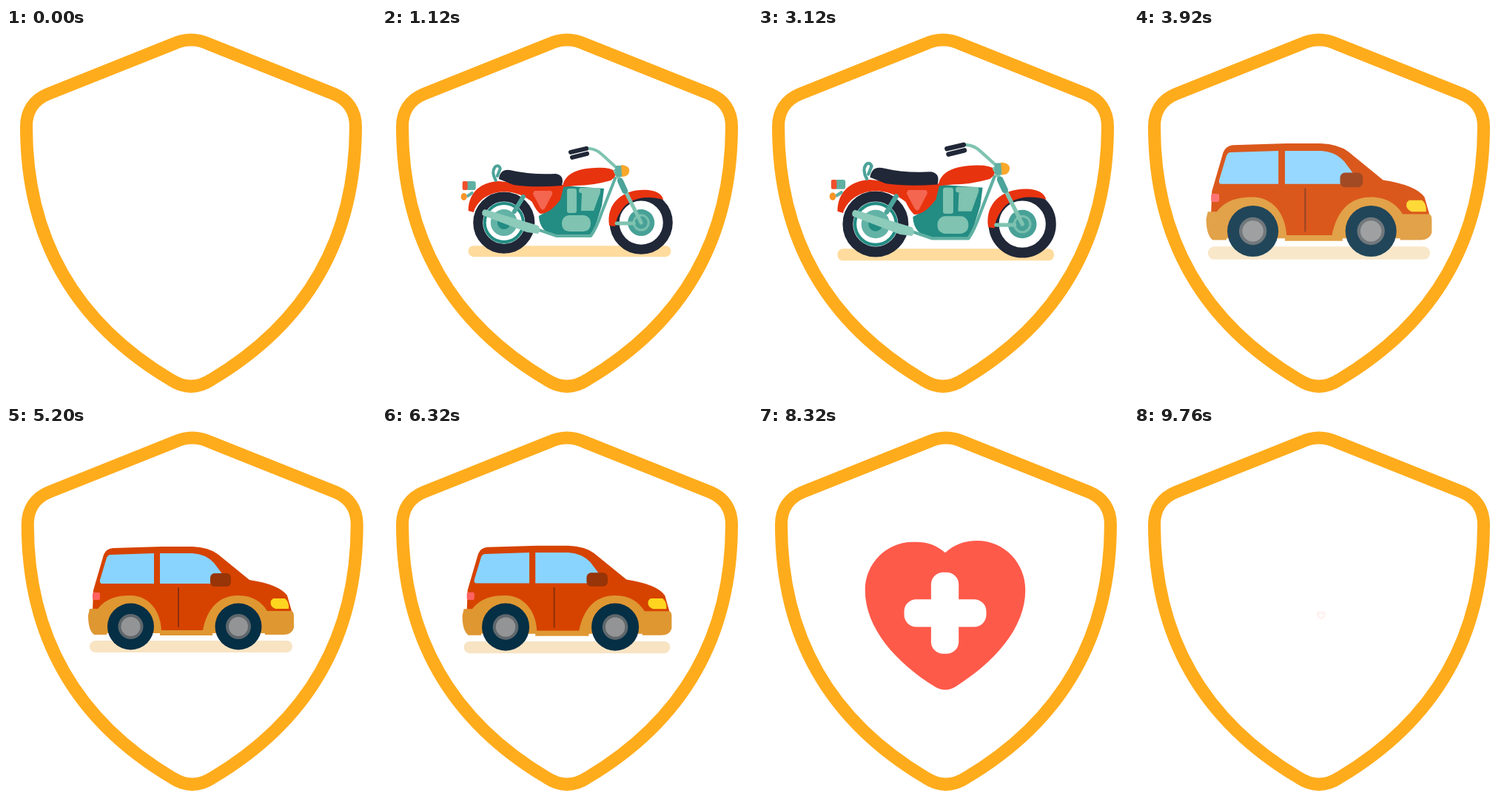
An HTML page for the animation above (9.84 s loop, 500 px wide and 500 px high).

```html
<!DOCTYPE html>
<html lang="en">
<head>
<meta charset="utf-8">
<title>Shield</title>
<style>
  html, body { margin: 0; height: 100%; overflow: hidden; background: #fff; }
  svg { display: block; width: 100%; height: 100%; }
</style>
</head>
<body>
<svg viewBox="0 0 500 500" fill="none" stroke-linecap="round" stroke-linejoin="round">
  <path id="shield" stroke="#ffac1c" stroke-width="17" d="M225 22Q250 10 275 22L444 89.500C462 97 472.500 112 472.500 133C472.500 318 374 418 277 475.500Q250 493 223 475.500C126 418 27.500 318 27.500 133C27.500 112 38 97 56 89.500Z"/>

  <g id="bike" visibility="hidden">
    <rect x="117" y="294" width="273" height="15" rx="7" fill="#ffdb9e"/>
    <g stroke="#202737" stroke-width="13" fill="#fff">
      <circle cx="165" cy="263" r="35"/>
      <circle cx="350" cy="263" r="36"/>
    </g>
    <circle cx="165" cy="263" r="26" stroke="#238c83" stroke-width="4"/>
    <g fill="#62b3a6">
      <circle cx="165" cy="263" r="18"/>
      <circle cx="350" cy="263" r="18" fill="#48a197"/>
    </g>
    <circle cx="165" cy="263" r="9" fill="#238c83"/>
    <circle cx="350" cy="263" r="10" stroke="#79bfae" stroke-width="3"/>
    <path fill="#238c83" d="M244 213L300 217L297 240L284 281H235Q213 276 212 254Q235 242 244 213Z"/>
    <path stroke="#5fb0a2" stroke-width="4" d="M210 272L236 281H282Q289 272 297 249L315 203"/>
    <g fill="#7fc3b0">
      <rect x="250" y="217" width="13" height="33" rx="3"/>
      <path d="M270 223L295 222L286 247H269Z"/>
      <rect x="243" y="253" width="39" height="22" rx="10"/>
      <rect x="266" y="216" width="29" height="7" rx="3"/>
    </g>
    <path fill="#e8330f" d="M117 247C117 222 134 208 158 207L205 212L203 235C181 217 151 217 134 233Q126 241 124 249Z"/>
    <path fill="#e8330f" d="M194 212H246L241 232Q227 251 214 251Q205 245 194 212Z"/>
    <path fill="#f46650" d="M206 220H228Q231 221 230 225L220 244Q217 248 214 243L204 224Z"/>
    <path fill="#e8330f" d="M244 215C246 198 262 190 288 189Q309 188 315 194Q317 201 309 206Q285 213 262 213Z"/>
    <path fill="#202737" d="M158 204Q160 190 173 192Q203 199 235 197Q247 199 243 213Q205 216 178 212Z"/>
    <path stroke="#4ca399" stroke-width="4" d="M154 206C145 190 157 181 160 190L156 200"/>
    <path stroke="#4ca399" stroke-width="6" d="M191 228L179 248"/>
    <path fill="#8ccaba" d="M139 245L211 267Q216 273 211 278L196 276L136 253Q134 247 139 245Z"/>
    <rect x="114" y="207" width="13" height="12" rx="3" fill="#5fb0a2"/>
    <rect x="109" y="207" width="7" height="12" rx="2" fill="#f0502c"/>
    <path stroke="#5fb0a2" stroke-width="4" d="M116 227L122 223"/>
    <ellipse cx="111" cy="228" rx="4" ry="5" fill="#f99428"/>
    <path fill="#e8330f" d="M307 267C302 234 329 216 360 219Q377 221 380 232C352 224 331 233 323 247Q316 257 315 268Z"/>
    <path stroke="#7fc3b0" stroke-width="5" d="M315 193L350 263M317 264H340"/>
    <path stroke="#4ca399" stroke-width="8" d="M322 207L328 220"/>
    <path stroke="#7fc3b0" stroke-width="4" d="M279 163Q290 164 297 171L318 190"/>
    <path stroke="#202737" stroke-width="6" d="M255 168L276 163M257 175L277 170"/>
    <rect x="315" y="186" width="11" height="15" rx="3" fill="#5fb0a2"/>
    <path fill="#fba82a" d="M323 185Q335 186 334 194Q333 201 324 201Z"/>
  </g>

  <g id="car" visibility="hidden">
    <rect x="113" y="290" width="274" height="16" rx="8" fill="#f8e4c3"/>
    <path fill="#d64300" d="M117 250L118 222L132 174Q135 166 144 165L210 163H252Q274 164 286 173L329 208Q369 214 380 229L386 250L350 277H140Z"/>
    <g fill="#89d4ff">
      <path d="M141 174L200 172V213H130Q126 213 127 208L136 178Q138 174 141 174Z"/>
      <path d="M208 172H252Q270 173 281 185L302 213H208Z"/>
    </g>
    <path stroke="#8e300b" stroke-width="2" d="M233 219V271"/>
    <rect x="276" y="199" width="28" height="18" rx="6" fill="#973408"/>
    <rect x="117" y="225" width="10" height="10" rx="2" fill="#ff6260"/>
    <path fill="#df9732" d="M113 247H124C135 233 150 229 168 229C193 229 209 250 210 276H266C272 246 288 229 314 229C333 229 346 238 353 250H386Q389 251 389 257V273Q386 282 375 282H119Q111 276 111 256Z"/>
    <path fill="#fff" d="M136 280H210V283H278V280H350V289H136Z"/>
    <path fill="#df9732" d="M208 276H279V283H208Z"/>
    <path fill="#ffd51f" d="M361 233H377Q383 238 382 247H364Q356 244 358 236Z"/>
    <g id="wheel">
      <circle cx="168.500" cy="271" r="31.500" fill="#052f45"/>
      <circle cx="168.500" cy="271" r="17" fill="#5f676c"/>
      <circle cx="168.500" cy="271" r="13" fill="#939495"/>
    </g>
    <use href="#wheel" x="145.500"/>
  </g>

  <g id="heart" visibility="hidden">
    <path fill="#fe5a4a" d="M253 163C239 150 222 146 205 147C165 147 134 180 134 218C134 275 180 326 238 362Q253 371 268 362C326 325 372 275 372 218C372 178 341 145 300 145C283 145 267 150 253 163Z"/>
    <rect x="232" y="192" width="41" height="121" rx="18" fill="#fff"/>
    <rect x="192" y="232" width="122" height="41" rx="18" fill="#fff"/>
  </g>
</svg>
<script>
const LOOP = 9840, STEP = 80;
const DELAY = 350, SLOT = 3140, EASE = 800;
const SHAKE = { start: 800, end: 1725, size: 7 };

const shield = document.getElementById("shield");
const items = [
  { id: "bike", x: 250, y: 235, size: 1 },
  { id: "car", x: 250, y: 235, size: 1 },
  { id: "heart", x: 253, y: 256, size: 0.91 }
].map(item => ({ ...item, node: document.getElementById(item.id) }));

const backIn = u => u * u * (2.70158 * u - 1.70158);

function drawItem({ node, x, y, size }, t) {
  const visible = t >= 0 && t < SLOT;
  node.setAttribute("visibility", visible ? "visible" : "hidden");
  if (!visible) return;
  const enter = Math.min(1, t / EASE);
  const leave = Math.max(0, (t - SLOT + EASE) / EASE);
  const scale = size * (1 - backIn(1 - enter) - backIn(leave));
  node.setAttribute("transform", `translate(${x} ${y}) scale(${scale}) translate(${-x} ${-y})`);
  node.setAttribute("opacity", Math.min(1, 1.65 * enter, 6 * (1 - leave)));
}

function draw(now) {
  const t = Math.floor((now % LOOP) / STEP) * STEP - DELAY;
  items.forEach((item, i) => drawItem(item, t - i * SLOT));

  const u = (t % SLOT - SHAKE.start) / (SHAKE.end - SHAKE.start);
  const shift = u > 0 && u < 1 ? SHAKE.size * Math.sin(5 * Math.PI * u) : 0;
  shield.setAttribute("transform", `translate(${shift} 0)`);
}

const begin = performance.now();
function tick() {
  draw(performance.now() - begin);
  requestAnimationFrame(tick);
}
tick();
</script>
</body>
</html>
```
